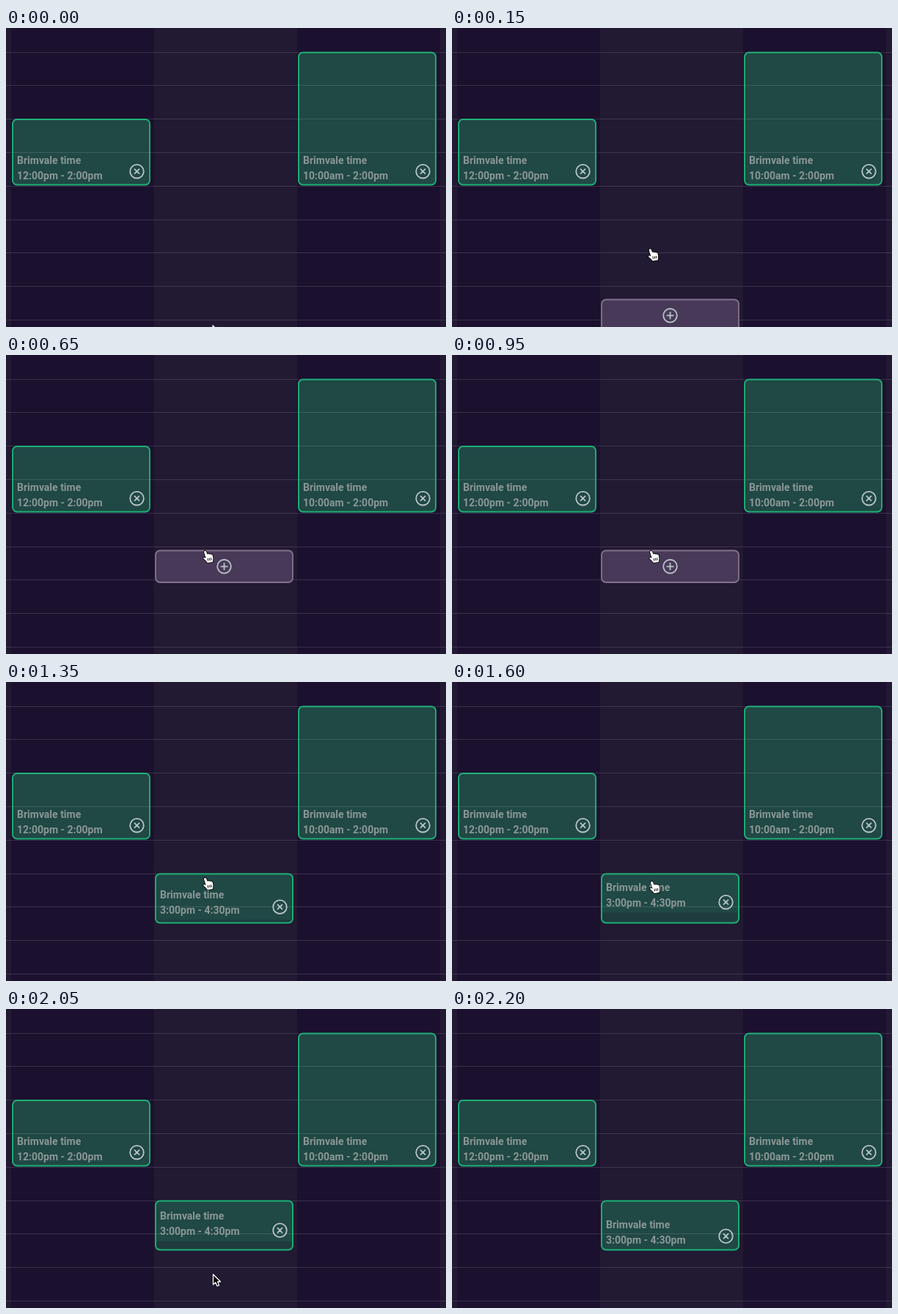
An HTML page with a canvas for the animation above (2250 ms loop, 600 px wide and 409 px high).

```html
<!DOCTYPE html>
<html lang="en">
<head>
<meta charset="utf-8">
<title>Calendar scheduling</title>
<style>
html, body { margin: 0; width: 100%; height: 100%; overflow: hidden; background: #1c102f; }
canvas { display: block; }
</style>
</head>
<body>
<canvas id="stage" width="600" height="409"></canvas>
<script>
const ctx = document.getElementById('stage').getContext('2d');
const LOOP = 2250, STEP = 50, CLICK = 1250, LEAVE = 2000;
const GREEN = '#1cb176', ICON = '#b8c5c4';
const HAND = new Path2D('M-1.6 2Q-1.6 .4 0 .4Q1.2 .4 1.6 2L2.4 5.6Q3.6 4.6 4.9 6Q6.2 5.2 7.2 6.6' +
  'Q9 6 9.4 8.2V12Q9 14 8.2 17H1.2Q-.5 14 -3.6 10.6Q-3.8 9 -2.2 9.2L-.2 10.6Z');
const KNUCKLES = new Path2D('M2.2 11V14.5M4.5 11V14.5M6.7 11V14.5');
const RESIZE = new Path2D('M0 -7.5L5.5 -2.5H2V2.5H5.5L0 7.5L-5.5 2.5H-2V-2.5H-5.5Z');
const ARROW = new Path2D('M0 0V14L3.3 11L5.5 16L8 15L6 10H10Z');

const clamp = v => Math.max(0, Math.min(1, v));
const smooth = (t, start, length) => {
  const u = clamp((t - start) / length);
  return u * u * (3 - 2 * u);
};

function rect(x, y, w, h) {
  ctx.beginPath();
  ctx.roundRect(x + 1, y + 1, w - 2, h - 2, 6);
}

function icon(x, y, turn) {
  ctx.save();
  ctx.translate(x, y);
  ctx.rotate(turn);
  ctx.strokeStyle = ICON;
  ctx.lineWidth = 1.8;
  ctx.beginPath();
  ctx.arc(0, 0, 9.3, 0, 7);
  ctx.moveTo(-5, 0); ctx.lineTo(5, 0);
  ctx.moveTo(0, -5); ctx.lineTo(0, 5);
  ctx.stroke();
  ctx.restore();
}

function fillCard({ x, top, bottom, handle = 0 }) {
  rect(x, top, 189, bottom - top);
  ctx.fillStyle = '#204845';
  ctx.fill();
  ctx.fillStyle = '#1f3b3d';
  ctx.fillRect(x + 2, bottom - handle, 185, Math.max(0, handle - 1));
}

function trimCard({ x, top, bottom, hours, handle = 0 }) {
  rect(x, top, 189, bottom - top);
  ctx.strokeStyle = GREEN;
  ctx.lineWidth = 1.9;
  ctx.stroke();
  ctx.fillStyle = '#8a9795';
  ctx.font = '700 14px Roboto, sans-serif';
  ctx.fillText('Brimvale time', x + 7, bottom - 29.5 - handle);
  ctx.fillText(hours, x + 7, bottom - 8.5 - handle);
  icon(x + 170.5, bottom - 19.3 - handle * 2 / 3, Math.PI / 4);
}

function drawSlot(y) {
  rect(203, y, 189, 45.5);
  ctx.fillStyle = '#483959';
  ctx.fill();
  ctx.strokeStyle = '#83738d';
  ctx.lineWidth = 1.8;
  ctx.stroke();
  icon(297.5, y + 22.8, 0);
}

function drawCursor(t) {
  const u = clamp(t / 350), rise = (1 - u) ** 2.5;
  const down = smooth(t, 1550, 300), out = clamp((t - LEAVE) / 150);
  const x = 271.3 + 10.7 * rise - 16 * u * (1 - u) + 11.2 * down;
  const y = 267.5 + 139.5 * rise + 64.5 * down + 93 * out;
  const arrow = t < STEP || out > 0;
  const resize = !arrow && t > CLICK && y > 315;
  const shape = arrow ? ARROW : resize ? RESIZE : HAND;
  const dark = arrow || resize;
  ctx.save();
  ctx.translate(x, y);
  ctx.lineJoin = 'round';
  ctx.strokeStyle = dark ? '#fff' : '#000';
  ctx.fillStyle = dark ? '#000' : '#fff';
  if (dark) {
    ctx.lineWidth = 1.3;
    ctx.fill(shape);
    ctx.stroke(shape);
  } else {
    ctx.rotate(-0.15);
    ctx.lineWidth = 1.6;
    ctx.stroke(shape);
    ctx.fill(shape);
    ctx.lineWidth = 0.9;
    ctx.stroke(KNUCKLES);
  }
  ctx.restore();
}

function draw(t) {
  ctx.fillStyle = '#221932';
  ctx.fillRect(0, 0, 600, 409);
  ctx.fillStyle = '#1c102f';
  ctx.fillRect(7, 0, 195, 409);
  ctx.fillRect(397, 0, 195, 409);

  const cards = [
    { x: 8, top: 124, bottom: 215.5, hours: '12:00pm - 2:00pm' },
    { x: 398, top: 32.5, bottom: 215.5, hours: '10:00am - 2:00pm' }
  ];
  if (t >= CLICK) {
    const handle = 15 * (smooth(t, CLICK, 250) - smooth(t, LEAVE - 10, 240));
    cards.push({ x: 203, top: 261.5, bottom: 330.5, hours: '3:00pm - 4:30pm', handle });
  }
  cards.forEach(fillCard);
  ctx.fillStyle = 'rgba(255,255,255,.13)';
  for (let i = 0; i < 9; i++) ctx.fillRect(0, Math.round(32.6 + 45.8 * i), 600, 1);
  cards.forEach(trimCard);

  // The hover slot trails the pointer until it settles.
  if (t >= STEP && t < CLICK) drawSlot(266.5 + 104 * Math.max(0, (350 - t) / 200) ** 1.5);
  drawCursor(t);
}

const begin = performance.now();
function tick() {
  const t = (performance.now() - begin) % LOOP;
  draw(Math.floor(t / STEP) * STEP);
  requestAnimationFrame(tick);
}
tick();
</script>
</body>
</html>
```
